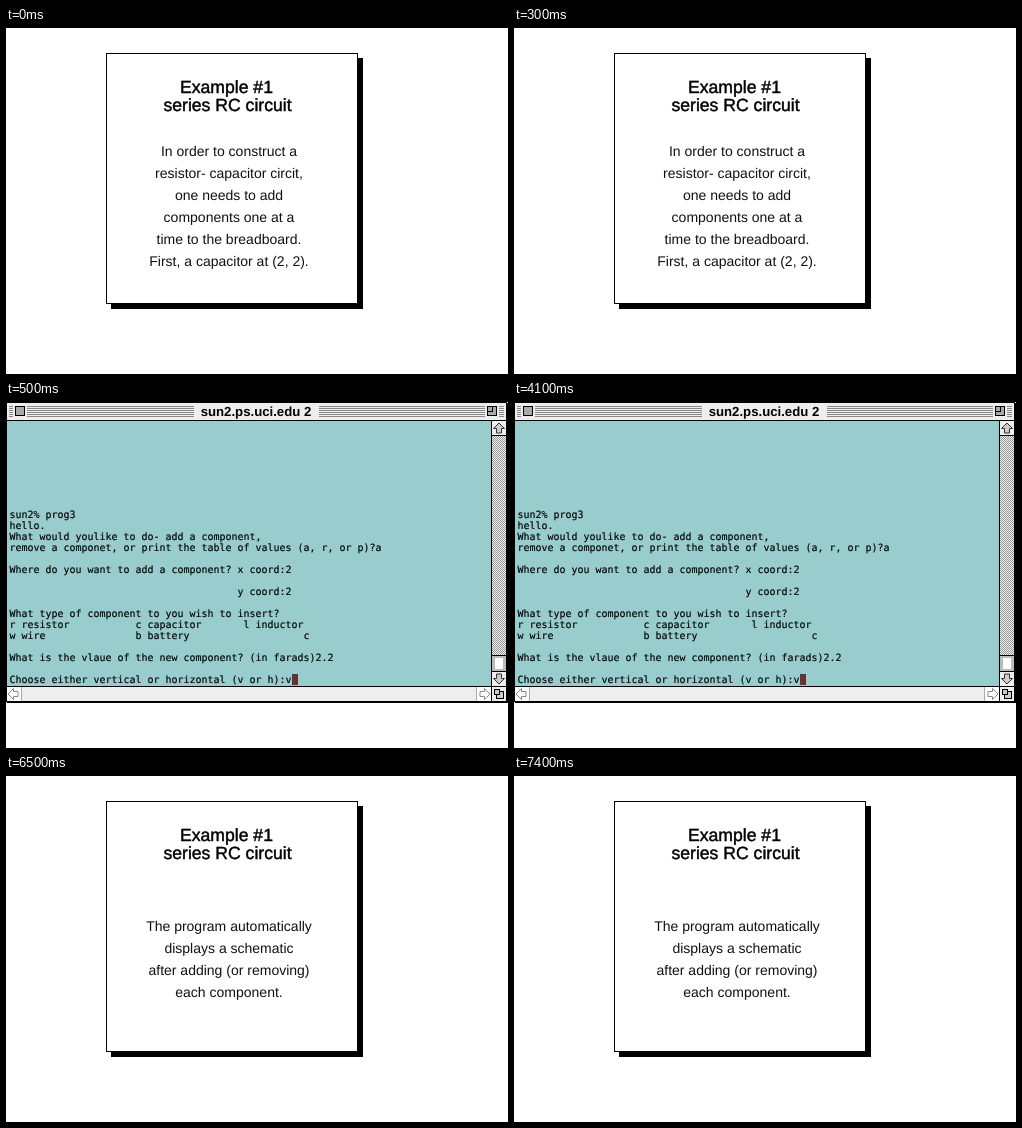
These frames come from a looping animation (502x346 px, 8 s). An HTML page:

```html
<!DOCTYPE html>
<html lang="en">
<head>
<meta charset="utf-8">
<title>Series RC circuit</title>
<style>
  html, body { margin: 0; width: 100%; height: 100%; overflow: hidden; background: #fff; }
  svg { display: block; width: 502px; height: 346px; }
  text { white-space: pre; text-rendering: geometricPrecision; }

  .scene { visibility: hidden; animation: 8s step-end infinite; }
  #intro { animation-name: intro; }
  #terminal { animation-name: terminal; }
  #outro { animation-name: outro; }
  @keyframes intro { 0% { visibility: visible; } 6.25%, 100% { visibility: hidden; } }
  @keyframes terminal { 0% { visibility: hidden; } 6.25% { visibility: visible; } 81.25%, 100% { visibility: hidden; } }
  @keyframes outro { 0% { visibility: hidden; } 81.25%, 100% { visibility: visible; } }

  .heading, .body { font-family: "Liberation Sans", Arial, sans-serif; text-anchor: middle; }
  .heading { font-size: 17.6px; stroke: #000; stroke-width: .45px; }
  .body { font-size: 14px; fill: #111; }
  .title { font: bold 13.2px "Liberation Sans", Arial, sans-serif; text-anchor: middle; }
  .console { font: 9.97px "DejaVu Sans Mono", monospace; stroke: #000; stroke-width: .15px; }
  .line { stroke: #000; shape-rendering: crispEdges; }
  .arrow { fill: #ccc; stroke: #333; }
  .idle { fill: #fff; stroke: #888; }
</style>
</head>
<body>
<svg viewBox="0 0 502 346">
  <defs>
    <g id="card">
      <path d="M105 30H357V281H105Z"/>
      <rect class="line" x="100.5" y="25.5" width="251" height="250" fill="#fff"/>
      <g class="heading">
        <text x="220.5" y="65">Example #1</text>
        <text x="221.5" y="83">series RC circuit</text>
      </g>
    </g>
    <path id="arrow" d="M0 -5.5L5.5 0H2.5V4.5H-2.5V0H-5.5Z"/>
    <pattern id="stripes" width="2" height="2" patternUnits="userSpaceOnUse">
      <path d="M0 0H2V1H0Z" fill="#888"/>
    </pattern>
    <pattern id="checks" width="2" height="2" patternUnits="userSpaceOnUse">
      <path d="M0 0H2V2H0Z" fill="#eee"/>
      <path d="M0 0H1V1H0ZM1 1H2V2H1Z" fill="#999"/>
    </pattern>
  </defs>

  <g id="intro" class="scene">
    <use href="#card"/>
    <g class="body" data-top="128"></g>
  </g>

  <g id="terminal" class="scene">
    <path d="M1 1H502V301H1Z" fill="#000"/>
    <rect class="line" x=".5" y=".5" width="500" height="299" fill="#99cccc"/>

    <rect x="1" y="1" width="499" height="17" fill="#eee"/>
    <path d="M3 4H188V15H3ZM313 4H498V15H313Z" fill="url(#stripes)"/>
    <path d="M7 3H21V16H7ZM479 3H493V16H479Z" fill="#eee"/>
    <g class="line" fill="#aaa" stroke="#444">
      <rect x="9.5" y="4.5" width="9" height="9"/>
      <rect x="481.5" y="4.5" width="9" height="9"/>
      <rect x="481.5" y="4.5" width="5" height="5"/>
    </g>
    <text class="title" x="250" y="14">sun2.ps.uci.edu 2</text>
    <path class="line" d="M0 18.5H501"/>

    <g class="line">
      <rect x="485.5" y="18.5" width="15" height="266" fill="url(#checks)"/>
      <rect x="485.5" y="18.5" width="15" height="15" fill="#eee"/>
      <rect x="485.5" y="269.5" width="15" height="15" fill="#eee"/>
      <rect x="485.5" y="253.5" width="15" height="16" fill="#bbb"/>
      <rect x="489" y="256" width="8" height="11" fill="#fff" stroke="none"/>
      <rect x=".5" y="284.5" width="485" height="15" fill="#eee"/>
      <path d="M1 285H15V299H1ZM471 285H485V299H471Z" fill="#fff" stroke="none"/>
      <path d="M15.5 285V299M470.5 285V299" stroke="#aaa"/>
      <rect x="485.5" y="284.5" width="15" height="15" fill="#eee"/>
      <rect x="490.5" y="289.5" width="7" height="7" fill="#ccc"/>
      <rect x="488.5" y="287.5" width="5" height="5" fill="#ccc"/>
    </g>
    <use href="#arrow" class="arrow" transform="translate(493 26.5)"/>
    <use href="#arrow" class="arrow" transform="translate(493 276.5) rotate(180)"/>
    <use href="#arrow" class="idle" transform="translate(7.5 292) rotate(-90)"/>
    <use href="#arrow" class="idle" transform="translate(478.5 292) rotate(90)"/>

    <g class="console"></g>
    <rect x="286" y="272" width="6" height="11" fill="#663333"/>
  </g>

  <g id="outro" class="scene">
    <use href="#card"/>
    <g class="body" data-top="155"></g>
  </g>
</svg>
<script>
  function addLines(selector, x, top, pitch, lines) {
    const group = document.querySelector(selector);
    lines.forEach((line, i) => {
      const text = document.createElementNS(group.namespaceURI, 'text');
      text.setAttribute('x', x);
      text.setAttribute('y', top + i * pitch);
      text.textContent = line;
      group.append(text);
    });
  }

  // Places each [column, string] pair on a monospaced row.
  const row = (...cells) => cells.reduce((line, [col, s]) => line.padEnd(col) + s, '');

  addLines('#intro .body', 223, 128, 22, [
    'In order to construct a',
    'resistor- capacitor circit,',
    'one needs to add',
    'components one at a',
    'time to the breadboard.',
    'First, a capacitor at (2, 2).'
  ]);

  addLines('#outro .body', 223, 155, 22, [
    'The program automatically',
    'displays a schematic',
    'after adding (or removing)',
    'each component.'
  ]);

  addLines('.console', 3.5, 116, 11, [
    'sun2% prog3',
    'hello.',
    'What would youlike to do- add a component,',
    'remove a componet, or print the table of values (a, r, or p)?a',
    '',
    'Where do you want to add a component? x coord:2',
    '',
    row([38, 'y coord:2']),
    '',
    'What type of component to you wish to insert?',
    row([0, 'r resistor'], [21, 'c capacitor'], [39, 'l inductor']),
    row([0, 'w wire'], [21, 'b battery'], [49, 'c']),
    '',
    'What is the vlaue of the new component? (in farads)2.2',
    '',
    'Choose either vertical or horizontal (v or h):v'
  ]);
</script>
</body>
</html>
```
